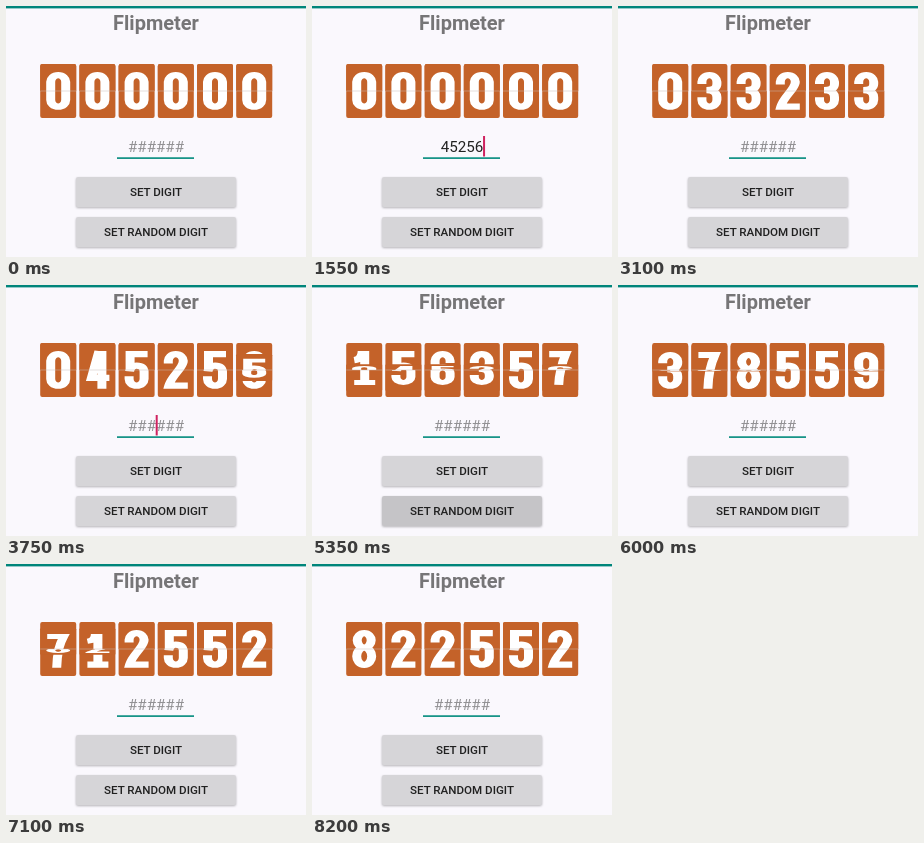
Animation of 300x251 px, one loop 8.25 s. Source, as an HTML page:

```html
<!DOCTYPE html>
<html lang="en">
<head>
<meta charset="utf-8">
<title>Flipmeter</title>
<style>
  html, body { margin: 0; width: 100%; height: 100%; overflow: hidden; background: #faf8fd; }
  svg { display: block; width: 300px; height: 251px; font-family: Roboto, sans-serif; text-anchor: middle; }
  .title { font-size: 20px; font-weight: 700; fill: #767577; }
  .label { font-size: 11.6px; font-weight: 500; fill: #202020; }
  #field { font-size: 15.2px; }
  .button { fill: #d6d5d8; filter: drop-shadow(0 1px 1px rgba(0, 0, 0, .28)); }
  .card rect { fill: #c46229; }
  .card path { fill: none; stroke: #fff; stroke-width: 9; }
  .seam { stroke: rgba(200, 188, 182, .6); stroke-width: .8; }
</style>
</head>
<body>
<svg viewBox="0 0 300 251">
  <defs>
    <clipPath id="top"><rect x="-1" y="-30" width="40" height="30"/></clipPath>
    <clipPath id="bottom"><rect x="-1" width="40" height="30"/></clipPath>
    <clipPath id="set"><rect x="70" y="171" width="160" height="30" rx="2"/></clipPath>
    <clipPath id="random"><rect x="70" y="211" width="160" height="30" rx="2"/></clipPath>
  </defs>
  <rect width="300" height="251" fill="#faf8fd"/>
  <rect width="300" height="2.4" fill="#00857a"/>
  <text class="title" x="150" y="24">Flipmeter</text>
  <g id="meter"></g>
  <text id="field" x="150" y="146"></text>
  <rect x="111" y="151.3" width="77" height="1.6" fill="#008a7c"/>
  <rect id="cursor" y="130" width="2" height="20.5" fill="#cf2360"/>
  <rect class="button" x="70" y="171" width="160" height="30" rx="2"/>
  <rect class="button" x="70" y="211" width="160" height="30" rx="2"/>
  <g clip-path="url(#set)"><circle id="setRipple" cx="150" cy="186"/></g>
  <g clip-path="url(#random)"><circle id="randomRipple" cx="150" cy="226"/></g>
  <text class="label" x="150" y="190">SET DIGIT</text>
  <text class="label" x="150" y="230">SET RANDOM DIGIT</text>
</svg>
<script>
const LOOP = 8250, FLIP = 265;
const SET_AT = 2308, RANDOM_AT = 5165;
const setFlips = [0, 4, 5, 2, 5, 6];
const randomFlips = [8, 8, 7, 3, 0, 6];
const typed = '45256', keyTimes = [700, 900, 1150, 1400, 1550];
const DIGIT_WIDTH = 8.54;

// Centre lines of the digits, drawn with a wide pen and squeezed vertically
const glyphs = [
  'M4.5 14a7.5 9.5 0 0 1 15 0V40a7.5 9.5 0 0 1-15 0Z',
  'M12.5 0V50M2 49.5H23M2 13Q10 12 10 0',
  'M4.5 18V14a7.5 9.5 0 0 1 15 0C19.5 25 8 34 5 49.5H24',
  'M4.5 17V14a7.5 9.5 0 0 1 15 0V17Q19.5 26 9 26Q19.5 26 19.5 36V40a7.5 9.5 0 0 1-15 0V36',
  'M16.5 0V54M24 38.5H6L13.5 0',
  'M23 4.5H5.5V28M5 29Q6 21 12 21Q19.5 21 19.5 30V40a7.5 9.5 0 0 1-15 0V36',
  'M19.5 17V14a7.5 9.5 0 0 0-15 0V40a7.5 9.5 0 0 0 15 0V33a7.5 9.5 0 0 0-15 0',
  'M1 4.5H17.5Q11 26 10.5 54',
  'M12 4.5a7 10.3 0 0 1 0 20.6a7 10.3 0 0 1 0-20.6ZM12 25.1a7.5 12.3 0 0 1 0 24.6a7.5 12.3 0 0 1 0-24.6Z',
  'M4.5 37V40a7.5 9.5 0 0 0 15 0V14a7.5 9.5 0 0 0-15 0V21a7.5 9.5 0 0 0 15 0'
];

const $ = id => document.getElementById(id);
const clamp = (v, lo, hi) => Math.min(hi, Math.max(lo, v));
const half = side => `<g clip-path="url(#${side})"><rect y="-27" width="36" height="54" rx="2"/>
  <path transform="translate(6 -19) scale(1 .7)"/></g>`;

$('meter').innerHTML = setFlips.map((_, i) =>
  `<g class="card" transform="translate(${34.2 + 39.2 * i} 85)">
    ${['top', 'bottom', 'top', 'bottom'].map(half).join('')}
    <path class="seam" d="M0 0H36" style="stroke-width:.8;stroke:rgba(200,188,182,.6)"/></g>`).join('');
const cards = [...document.querySelectorAll('.card')].map(c => [...c.querySelectorAll('g')]);

function showHalf(g, digit, scale) {
  g.lastElementChild.setAttribute('d', glyphs[digit % 10]);
  g.setAttribute('transform', `scale(1 ${scale})`);
  g.style.display = scale > .002 ? '' : 'none';
}

function drawCard([top, bottom, topFlap, bottomFlap], turns) {
  const digit = Math.floor(turns);
  const fall = (1 - Math.cos(Math.PI * (turns - digit))) / 2;
  const next = fall ? digit + 1 : digit;
  showHalf(top, next, 1);
  showHalf(bottom, digit, 1);
  showHalf(topFlap, digit, 1 - fall);
  showHalf(bottomFlap, next, fall);
}

function drawField(t) {
  const count = t < SET_AT - 50 ? keyTimes.filter(k => k <= t).length : 0;
  const field = $('field'), cursor = $('cursor');
  field.textContent = count ? typed.slice(0, count) : '######';
  field.setAttribute('fill', count ? '#222' : '#929194');
  const on = t >= 400 && t < 2000 || t >= 2000 && (t + 550) % 1000 < 500;
  cursor.setAttribute('x', 149.7 + count * DIGIT_WIDTH / 2);
  cursor.style.display = on ? '' : 'none';
}

function drawRipple(id, t, press, release) {
  const fade = 1 - clamp((t - release - 100) / 250, 0, 1);
  $(id).setAttribute('r', 85 * clamp((t - press) / 350, 0, 1));
  $(id).setAttribute('opacity', .12 * clamp((t - press) / 100, 0, 1) * fade);
}

function frame(now) {
  const t = now % LOOP;
  cards.forEach((card, i) => drawCard(card,
    clamp((t - SET_AT) / FLIP, 0, setFlips[i]) + clamp((t - RANDOM_AT) / FLIP, 0, randomFlips[i])));
  drawField(t);
  drawRipple('setRipple', t, 2000, SET_AT);
  drawRipple('randomRipple', t, 4750, RANDOM_AT);
}

let start;
function tick(now) {
  start ??= now;
  frame(now - start);
  requestAnimationFrame(tick);
}
frame(0);
requestAnimationFrame(tick);
</script>
</body>
</html>
```
